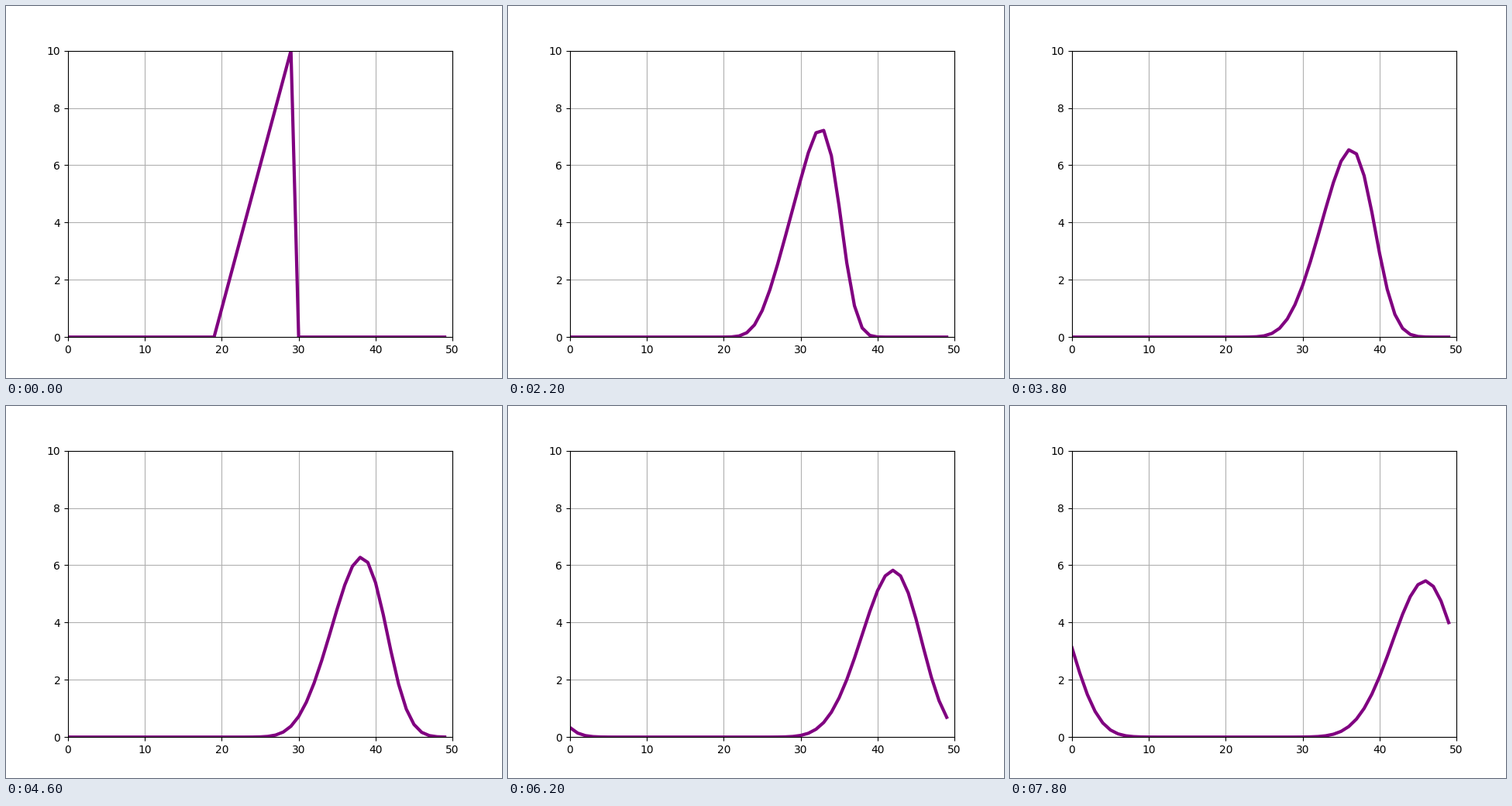
A matplotlib script that plays this animation: 640x480 px, repeating every 8000 ms.

```python
import numpy as np
import matplotlib.pyplot as plt
from matplotlib.animation import FuncAnimation

CELLS = 50
FRAMES = 40
COURANT = 0.5

# Sawtooth pulse carried to the right by a periodic upwind scheme
x = np.arange(CELLS)
u = np.where((x > 19) & (x < 30), x - 19.0, 0.0)
states = []
for _ in range(FRAMES):
    states.append(u)
    u = u - COURANT * (u - np.roll(u, 1))

fig, ax = plt.subplots(figsize=(6.4, 4.8), dpi=100)
ax.set_xlim(0, CELLS)
ax.set_ylim(0, 10)
ax.grid(True)
line, = ax.plot(x, states[0], color="purple", linewidth=3)


def init():
    line.set_ydata(states[0])
    return line,


def update(frame):
    line.set_ydata(states[frame])
    return line,


anim = FuncAnimation(fig, update, frames=FRAMES, init_func=init,
                     interval=200, repeat=True, repeat_delay=0)
plt.show()
```
